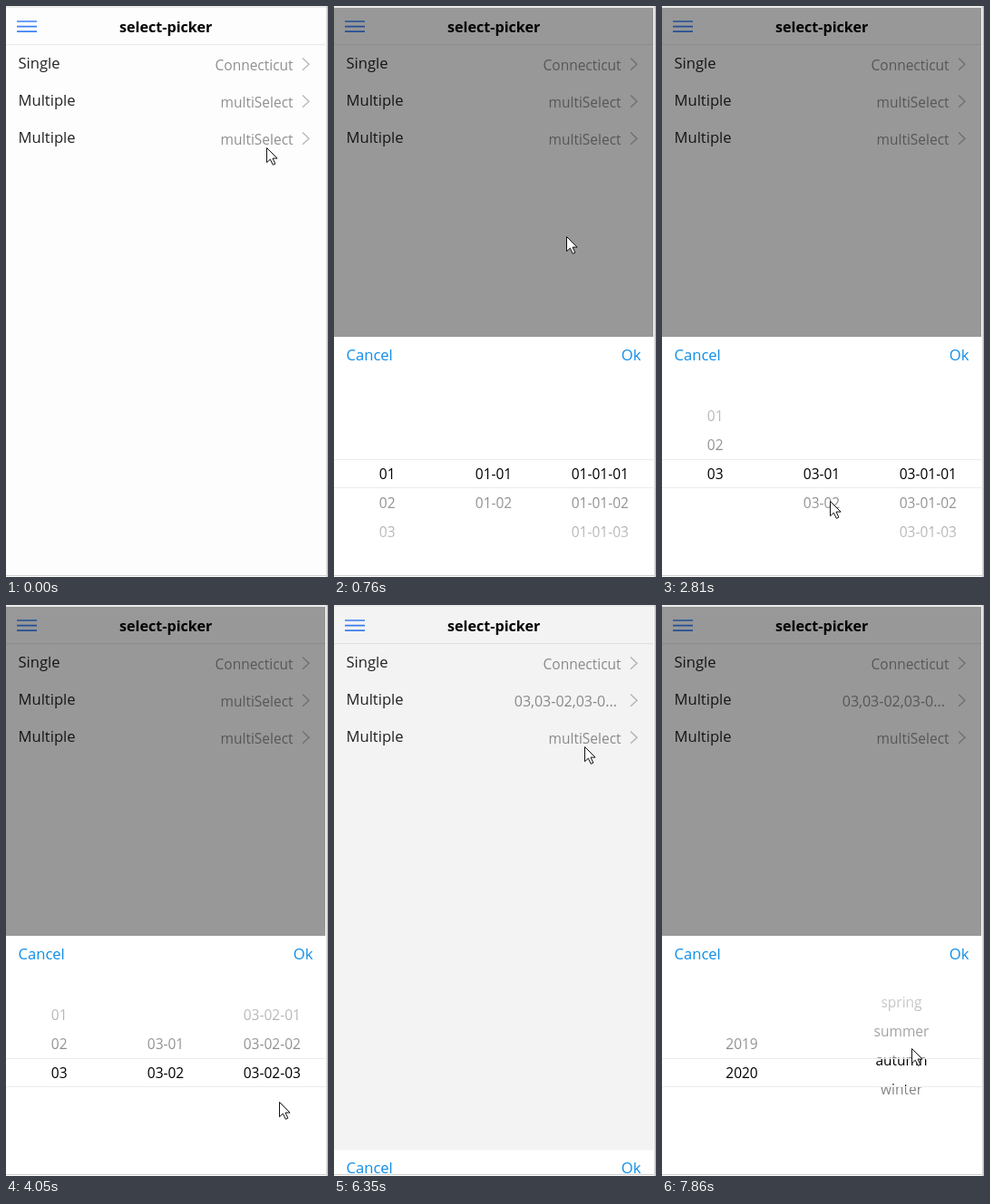
Animation, 355 px wide and 630 px high, one loop 7990 ms. Source, as an HTML page:

```html
<!DOCTYPE html>
<html lang="en">
<head>
<meta charset="utf-8">
<title>select-picker</title>
<style>
html, body { margin: 0; width: 100%; height: 100%; overflow: hidden; background: #fdfdfd; }
svg { display: block; width: 100%; height: 100%; font-family: "Open Sans", "Noto Sans", sans-serif; }
.title { font-size: 16.1px; font-weight: 700; text-anchor: middle; }
.label { font-size: 16.6px; fill: #222; }
.value { font-size: 15.5px; fill: #8f8f8f; text-anchor: end; }
.picked { font-size: 16px; }
.action { font-size: 16.6px; fill: #0f8de8; }
.item { font-size: 15.5px; text-anchor: middle; }
.end { text-anchor: end; }
</style>
</head>
<body>
<svg viewBox="0 0 355 630">
  <defs>
    <clipPath id="screen"><rect y="2" width="352" height="625"/></clipPath>
    <clipPath id="wheel"><rect y="405" width="352" height="222"/></clipPath>
    <linearGradient id="fadeUp" x1="0" y1="1" x2="0" y2="0">
      <stop stop-color="#fff" stop-opacity=".5"/>
      <stop offset="1" stop-color="#fff" stop-opacity=".94"/>
    </linearGradient>
    <linearGradient id="fadeDown" href="#fadeUp" x1="0" y1="0" x2="0" y2="1"/>
  </defs>
  <rect width="355" height="630" fill="#fdfdfd"/>
  <path d="M0 1H354" stroke="#e6e6e6" stroke-width="1.5"/>
  <path d="M354.2 0V630" stroke="#b4b4b4" stroke-width="1.4"/>
  <path d="M0 628.5H355" stroke="#cfcfcf"/>
  <g clip-path="url(#screen)">
    <path d="M12 17H34M12 22.6H34M12 28.2H34" stroke="#3d82f7" stroke-width="1.7"/>
    <text class="title" x="176.2" y="28.6">select-picker</text>
    <path d="M0 42.7H352" stroke="#e7e7e7"/>
    <g id="rows"></g>
    <rect id="dim" width="352" height="630"/>
    <g id="panel">
      <rect y="365" width="352" height="265" fill="#fff"/>
      <text class="action" x="13.5" y="391">Cancel</text>
      <text class="action end" x="338.5" y="391">Ok</text>
      <g clip-path="url(#wheel)">
        <g id="items"></g>
        <rect y="405" width="352" height="95.5" fill="url(#fadeUp)"/>
        <rect y="531.5" width="352" height="95.5" fill="url(#fadeDown)"/>
        <path d="M0 500.5H352M0 531.5H352" stroke="#ececec"/>
      </g>
    </g>
  </g>
  <path id="cursor" d="M0 0V16.2L3.8 12.7 6.8 18.8 9.4 17.6 6.5 11.6H11.6Z" fill="#fff" stroke="#111" stroke-linejoin="round"/>
</svg>
<script>
const LOOP = 7990, STEP = 32, PANEL = 262, GLIDE = 300;
const OPEN = 300, CONFIRM = 4580, REOPEN = 6293;
const $ = id => document.getElementById(id);

function add(parent, tag, attrs, text = "") {
  const node = document.createElementNS("http://www.w3.org/2000/svg", tag);
  for (const key in attrs) node.setAttribute(key, attrs[key]);
  node.textContent = text;
  return parent.appendChild(node);
}

const values = ["Single", "Multiple", "Multiple"].map((name, i) => {
  const y = 41 * i;
  add($("rows"), "text", { class: "label", x: 13.5, y: 69 + y }, name);
  add($("rows"), "path", { d: `M327 ${57.6 + y}l7 6.6-7 6.6`, fill: "none", stroke: "#b9b9b9", "stroke-width": 1.4 });
  return add($("rows"), "text", { class: "value", x: 316.5, y: 70.6 + y }, i ? "multiSelect" : "Connecticut");
});
const items = Array.from({ length: 8 }, () => add($("items"), "text", { class: "item" }));

function ramp(t, from, span = GLIDE) {
  const u = Math.min(1, Math.max(0, (t - from) / span));
  return u * u * (3 - 2 * u);
}

// The pointer rests at each stop for `hold`; a drag pulls one wheel up by `steps`.
const rest = (time, x, y, hold = 0) => ({ time, x, y, hold, steps: 0 });
const drag = (wheel, time, x, y, steps = 1) => ({ wheel, time, x, y, steps, hold: GLIDE });

const stops = [
  rest(0, 288, 156, 100),
  rest(270, 286, 109, 180),
  rest(760, 257, 254),
  drag("group", 1300, 62, 558),
  drag("group", 2150, 62, 547),
  rest(2780, 186, 546, 60),
  drag("sub", 3200, 186, 546),
  drag("leaf", 3640, 302, 558, 2),
  rest(4050, 302, 548),
  rest(4450, 325, 383, 350),
  rest(5140, 314, 298),
  rest(5410, 279, 94),
  rest(5680, 279, 137, 250),
  rest(6100, 277, 156, 380),
  drag("year", 7030, 88, 540),
  drag("season", 7560, 276, 567, 2.44)
];

function pointerAt(t) {
  const next = stops.findIndex(s => s.time > t);
  const a = stops.at(next < 0 ? -1 : next - 1), b = stops[next] || a;
  const left = a.time + a.hold, lift = a.y - a.steps * STEP;
  if (t <= left || a === b) return [a.x, a.y + (lift - a.y) * ramp(t, a.time)];
  const e = ramp(t, left, b.time - left);
  return [a.x + (b.x - a.x) * e, lift + (b.y - lift) * e];
}

const scrollOf = (wheel, t) => stops
  .filter(s => s.wheel === wheel)
  .reduce((sum, s) => sum + s.steps * ramp(t, s.time), 0);

const numbered = (prefix, n) => Array.from({ length: n }, (_, i) => `${prefix}0${i + 1}`);

function columns(t) {
  if (t > REOPEN) return [
    [["2019", "2020"], scrollOf("year", t)],
    [["spring", "summer", "autumn", "winter"], scrollOf("season", t)]
  ];
  const group = scrollOf("group", t), sub = scrollOf("sub", t);
  const first = `0${Math.floor(group) + 1}-`;
  const second = `${first}0${Math.floor(sub) + 1}-`;
  return [
    [numbered("", 3), group],
    [numbered(first, 2), sub],
    [numbered(second, 3), scrollOf("leaf", t)]
  ];
}

function drawWheels(t) {
  const cols = columns(t);
  let used = 0;
  cols.forEach(([names, pos], c) => names.forEach((name, i) => {
    const node = items[used++];
    node.textContent = name;
    node.setAttribute("x", 352 * (c + 0.5) / cols.length);
    node.setAttribute("y", 521.8 + (i - pos) * STEP);
  }));
  items.slice(used).forEach(node => node.textContent = "");
}

function draw(t) {
  const shown = ramp(t, OPEN) - ramp(t, CONFIRM) + ramp(t, REOPEN);
  $("dim").setAttribute("opacity", 0.4 * shown);
  $("panel").setAttribute("transform", `translate(0 ${PANEL * (1 - shown)})`);
  const chosen = t >= CONFIRM;
  values[1].textContent = chosen ? "03,03-02,03-0..." : "multiSelect";
  values[1].classList.toggle("picked", chosen);
  values[1].setAttribute("x", chosen ? 312 : 316.5);
  drawWheels(t);
  const [x, y] = pointerAt(t).map(Math.round);
  $("cursor").setAttribute("transform", `translate(${x - 0.5} ${y + 0.5})`);
}

const start = performance.now();
function tick() {
  draw((performance.now() - start) % LOOP);
  requestAnimationFrame(tick);
}
tick();
</script>
</body>
</html>
```
